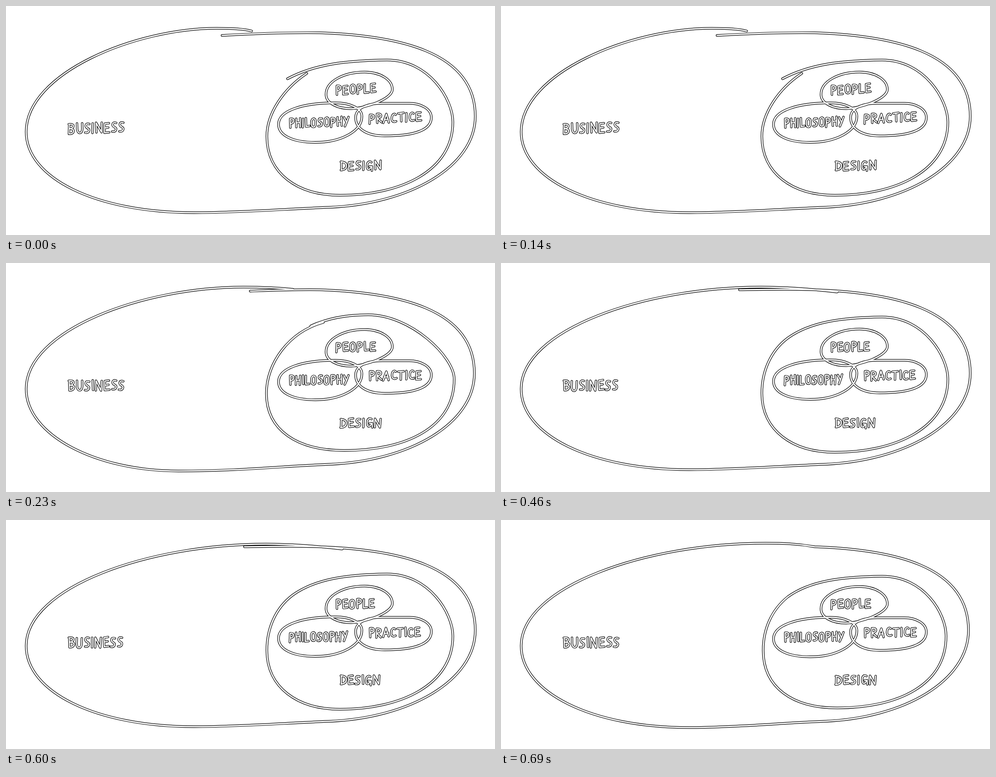
Recreate the animation shown at these times as an HTML page with a canvas. Size 1091x513 px, loop 0.92 s.

```html
<!DOCTYPE html>
<html lang="en">
<head>
<meta charset="utf-8">
<title>Business and design</title>
<style>
html, body { margin: 0; width: 100%; height: 100%; overflow: hidden; background: #fff; }
canvas { display: block; }
</style>
</head>
<body>
<canvas id="stage" width="1091" height="513" role="img"
  aria-label="Business contains Design, which contains People, Philosophy and Practice"></canvas>
<script>
const ctx = document.getElementById('stage').getContext('2d');
const STEP = 230;
const GAP = 4;

// Single-stroke letters, 20 units tall: [width, path]
const GLYPHS = {
  A: [12, 'M0 20L6 1L11 19M2 13L10 12'],
  B: [11, 'M1 1V19M0 1Q10 0 9 5Q8 9 2 9Q11 10 10 14Q9 19 1 19'],
  C: [10, 'M9 3Q5 -1 2 5Q0 12 2 16Q5 20 10 17'],
  D: [11, 'M1 1V19M0 1Q11 2 11 9Q11 18 0 19'],
  E: [10, 'M9 1L1 2V19L10 18M1 10L8 9'],
  G: [12, 'M10 3Q5 -1 2 6Q0 14 3 18Q7 20 10 12M6 12L11 12V21'],
  H: [11, 'M1 1V19M10 0V19M1 10L10 9'],
  I: [3, 'M1.5 1V19'],
  L: [9, 'M1 1V19L9 18'],
  N: [13, 'M1 19V1L11 19L12 1'],
  O: [12, 'M6 1Q1 2 1 10Q1 19 6 19Q11 19 11 10Q11 1 6 1Z'],
  P: [10, 'M1 20V1Q10 0 9 6Q8 11 1 11'],
  R: [10, 'M1 20V1Q10 0 9 6Q8 10 1 10L10 19'],
  S: [10, 'M9 2Q2 0 2 6Q3 9 6 10Q10 12 8 16Q6 19 1 18'],
  T: [11, 'M0 2L11 1M5.5 1.5V19'],
  U: [12, 'M1 1V12Q2 19 6 19Q10 19 11 12V1'],
  Y: [11, 'M1 1L6 10M11 0Q8 10 3 20']
};

// left, top, right, height, rise along the word
const WORDS = {
  BUSINESS: [140, 263, 263, 24, -4],
  PEOPLE: [737, 178, 824, 21, -5],
  PHILOSOPHY: [633, 252, 764, 21, -4],
  PRACTICE: [811, 242, 926, 21, -5],
  DESIGN: [747, 348, 837, 21, -2]
};

const SMALL_RINGS = [
  'M862 187C862 165 835 148 800 148C755 148 714 168 714 198C714 218 740 230 770 230C800 230 862 208 862 187Z',
  'M608 265C608 235 660 217 735 217C770 217 794 230 794 247C794 282 745 305.5 690 305.5C640 305.5 608 290 608 265Z',
  'M949 250C949 230 925 218 900 218L840 218C800 218 780 232 780 250C780 275 805 291 845 291C890 291 949 285 949 250Z'
].map(d => new Path2D(d));

// Counter-clockwise from the top (tx, ty) past the bottom (bx, by) and right edge r
const outer = (head, tx, ty, bx, by, r, tail) =>
  `${head} ${tx} ${ty}C${160 + 0.275 * tx} ${ty} 45 150 45 282
  C45 385 200 ${by} ${bx} ${by}C520 ${by} 620 455 720 451
  C900 444 ${r} 360 ${r} 247C${r} 100 870 66 700 60${tail}`;

// Counter-clockwise from the left edge l to the top (tx, ty)
const inner = (head, l, bx, by, r, tx, ty, tail) =>
  `${head} ${l} 292C${l} 375 650 ${by} ${bx} ${by}
  C${bx + 135} ${by} ${r} 370 ${r} 260C${r} 210 ${tx + 95} ${ty} ${tx} ${ty}${tail}`;

const BIG_RINGS = [
  [outer('M548 56C530 51 500 50', 470, 50, 420, 463, 1047, 'C620 59 550 62 482 66'),
    inner('M671 151C620 185 582 240', 582, 745, 424, 997, 850, 121, 'C760 122 690 130 628 163')],
  [outer('M640 59C600 55 570 54', 530, 54, 385, 466, 1045, 'C650 59 600 61 545 63'),
    inner('M708 133C630 155 581 225', 581, 755, 420, 1000, 808, 116, 'C760 116 715 125 680 141')],
  [outer('M750 65C690 58 640 54', 580, 54, 420, 463, 1047, 'C650 58 600 59 532 60'),
    inner('M640 168C600 198 582 245', 582, 745, 424, 997, 850, 121, 'C760 122 690 132 640 168Z')],
  [outer('M700 60C660 53 630 52', 590, 52, 420, 465, 1043, 'Z'),
    inner('M640 172C603 202 585 245', 585, 750, 421, 993, 850, 126, 'C760 127 690 136 640 172Z')]
];

function addWord(path, word, pose) {
  let [left, top, right, height, rise] = WORDS[word];
  if (pose) rise *= 0.4;
  if (pose === 2) right -= 3;
  const total = [...word].reduce((w, ch) => w + GLYPHS[ch][0] + GAP, -GAP);
  const scale = (right - left) / total;
  let x = 0;
  [...word].forEach((ch, i) => {
    const [width, d] = GLYPHS[ch];
    const wobble = Math.sin(i * 2.4 + pose * 1.9 + word.length);
    const place = new DOMMatrix()
      .translate(left + x * scale, top + rise * x / total + wobble * 0.7)
      .rotate(wobble * 2)
      .scale(scale, height / 20);
    path.addPath(new Path2D(d), place);
    x += width + GAP;
  });
}

function build(shapes, step) {
  const rings = new Path2D(), words = new Path2D();
  const pose = step === 3 ? 1 : step;
  const drift = new DOMMatrix().translate(0, step % 2);
  shapes.forEach(d => rings.addPath(new Path2D(d)));
  SMALL_RINGS.forEach(ring => rings.addPath(ring, drift));
  Object.keys(WORDS).forEach(word => addWord(words, word, pose));
  return { rings, words };
}

const scenes = BIG_RINGS.map(build);

// Black stroke with a white core leaves a double line
function hollow(path, width) {
  ctx.strokeStyle = '#000';
  ctx.lineWidth = width;
  ctx.stroke(path);
  ctx.strokeStyle = '#fff';
  ctx.lineWidth = width - 2.4;
  ctx.stroke(path);
}

function draw() {
  const { rings, words } = scenes[Math.floor(performance.now() / STEP) % scenes.length];
  ctx.fillStyle = '#fff';
  ctx.fillRect(0, 0, 1091, 513);
  ctx.lineCap = ctx.lineJoin = 'round';
  hollow(rings, 5.4);
  hollow(words, 5);
  requestAnimationFrame(draw);
}
draw();
</script>
</body>
</html>
```
